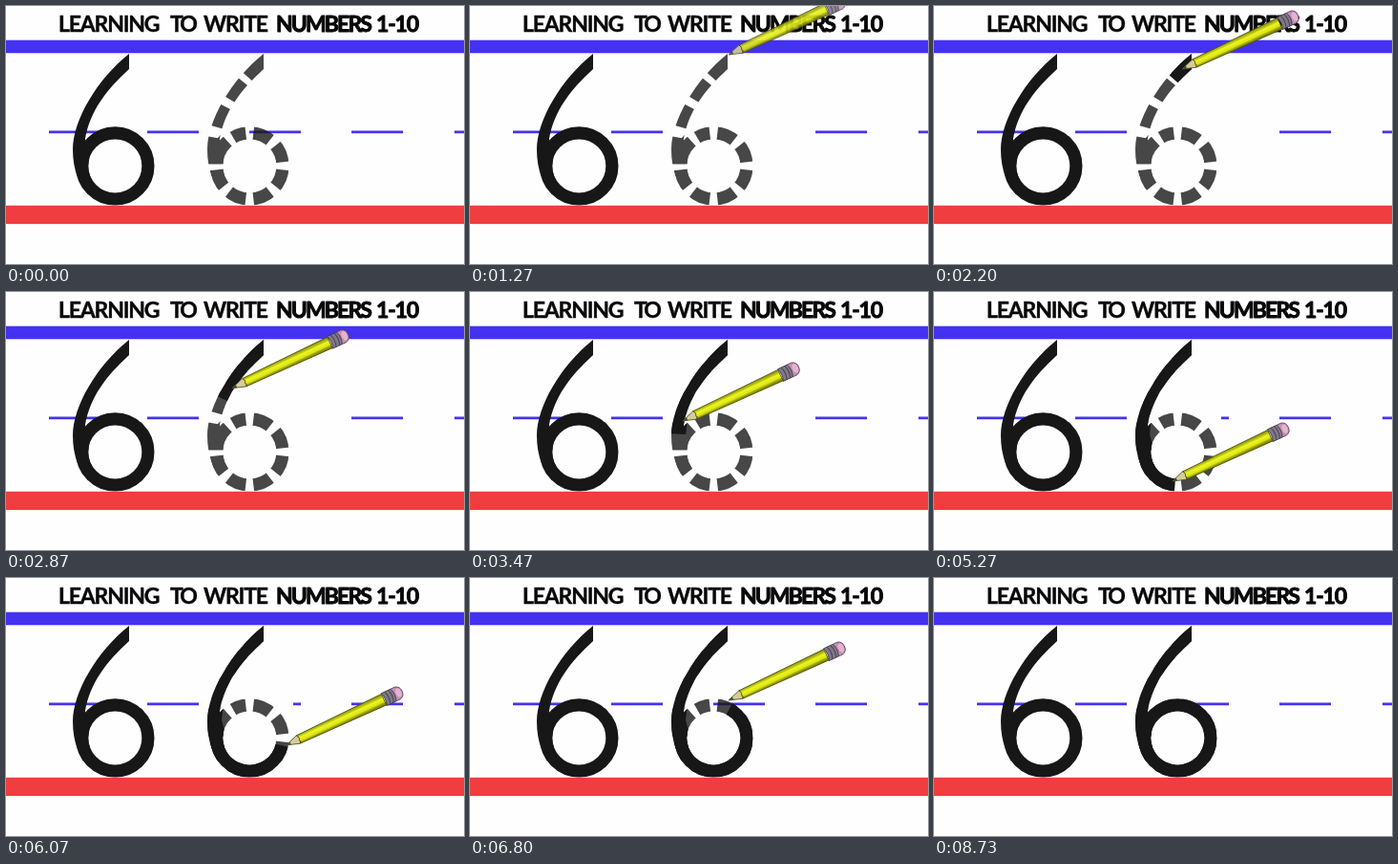
Recreate the animation shown at these times as an HTML page. Size 480 by 270 pixels, loop 8790 ms.

```html
<!DOCTYPE html>
<html lang="en">
<head>
<meta charset="utf-8">
<title>Learning to write numbers</title>
<style>
  html, body { margin: 0; width: 100%; height: 100%; overflow: hidden; background: #fefefe; }
  svg { display: block; width: 100vw; height: 100vh; }
  .title { font: 700 23px Lato, "Open Sans", sans-serif; letter-spacing: -1.2px; fill: #080808; stroke: #080808; stroke-width: .4; stroke-linejoin: round; }
  .tight { letter-spacing: -3px; }
  .heavy { letter-spacing: -1.9px; stroke-width: .9; }
  .wipe { fill: none; stroke: #fff; stroke-width: 20; }
</style>
</head>
<body>
<svg viewBox="0 0 480 270">
  <defs>
    <g id="six">
      <circle cx="114.3" cy="167.4" r="34.6" fill="none" stroke="#171717" stroke-width="13.2"/>
      <path d="M129 50C95 77 70 120 70 150C70 172 77 187 86 197L91 184Q84 172 87 161L83 139C88 110 105 88 129 66Z" fill="#171717"/>
    </g>
    <mask id="dashes" maskUnits="userSpaceOnUse" x="0" y="0" width="480" height="270">
      <path class="wipe" d="M136 50L131 55C102 79 78 115 77 150V167" stroke-dasharray="34 7 23 9 23 11 28 99"/>
      <path class="wipe" d="M79.7 167.4A34.6 34.6 0 0 0 148.9 167.4A34.6 34.6 0 0 0 79.7 167.4" pathLength="8"
            stroke-dasharray="0 .15 .7 .3 .7 .3 .7 .3 .7 .3 .7 .3 .7 .3 .52 .26 .92 9"/>
    </mask>
    <mask id="written" maskUnits="userSpaceOnUse" x="0" y="0" width="480" height="270">
      <path id="wipe" class="wipe" d="M136 50L131 55C102 79 76 115 75 150L79.7 167.4A34.6 34.6 0 0 0 148.9 167.4A34.6 34.6 0 0 0 79.7 167.4"/>
    </mask>
    <linearGradient id="paint" x2="0" y2="1">
      <stop offset="0" stop-color="#858b08"/>
      <stop offset=".25" stop-color="#bcc40a"/>
      <stop offset=".38" stop-color="#ecf526"/>
      <stop offset=".66" stop-color="#dbe60c"/>
      <stop offset=".78" stop-color="#a0a608"/>
      <stop offset="1" stop-color="#6c700a"/>
    </linearGradient>
  </defs>

  <rect width="480" height="270" fill="#fefefe"/>
  <path d="M45 131.8H98M148 131.8H202M255 131.8H309M362 131.8H416M470 131.8H480" stroke="#4432f0" stroke-width="2.8"/>
  <rect id="patch" x="205" y="128" height="7" fill="#fefefe"/>
  <rect y="35.7" width="480" height="13.6" fill="#4432f0"/>
  <rect y="208.8" width="480" height="19.3" fill="#f03d40"/>

  <g class="title">
    <text x="55" y="27">LEARNING</text>
    <text class="tight" x="172" y="27">TO</text>
    <text x="207" y="27">WRITE</text>
    <text class="heavy" x="283" y="27">NUMBERS</text>
    <text x="388" y="27" stroke-width=".9">1-10</text>
  </g>

  <use href="#six"/>
  <g transform="translate(141 0)">
    <g mask="url(#dashes)" opacity=".79"><use href="#six"/></g>
    <g mask="url(#written)"><use href="#six"/></g>
  </g>

  <g id="pencil" stroke-linejoin="round">
    <path d="M0 0L14 -4.6L17 0L14 4.6Z" fill="#d6cc98" stroke="#55502a" stroke-width=".8"/>
    <path d="M0 0L5 -1.8V1.8Z" fill="#4a4a30"/>
    <path d="M14 -4.6L113 -6.3V6.3L14 4.6Q17 3 14.5 1.5Q17 -1 14 -4.6Z" fill="url(#paint)" stroke="#4c500a" stroke-width=".8"/>
    <path d="M113 -7H124Q127 0 124 7H113Q116 0 113 -7Z" fill="#80788a" stroke="#3d3740" stroke-width=".8"/>
    <path d="M117 -7Q120 0 117 7M121 -7Q124 0 121 7" fill="none" stroke="#4a434e"/>
    <path d="M124 -7H129Q134 -5.5 134 0T129 7H124Q127 0 124 -7Z" fill="#c48fb4" stroke="#5d4055" stroke-width=".8"/>
    <ellipse cx="130" rx="2.8" ry="4.8" fill="#e4b4d2"/>
  </g>
</svg>
<script>
const LOOP = 8790, STEP = 200 / 3;
const byId = id => document.getElementById(id);
const wipe = byId('wipe'), pencil = byId('pencil'), patch = byId('patch');
const wipeLength = wipe.getTotalLength();

// time, tip x, tip y
const tipPath = [
  [1600, 271, 51], [2200, 260, 66], [2800, 239, 97], [3330, 225, 127], [3470, 223, 135],
  [4330, 224.5, 173.5], [4800, 233, 190], [5270, 250, 198], [5700, 278, 194], [6130, 295, 171],
  [6480, 291, 146], [6800, 271, 128], [7000, 259, 126], [7430, 231, 137]
];
// time, written length
const inkPath = [
  [1600, 0], [2200, 37], [3470, 119], [4330, 147], [5270, 190], [6800, 284], [7430, wipeLength + 1]
];

const clamp = v => Math.max(0, Math.min(1, v));

function sample(table, t, column, smooth) {
  const last = table.length - 1;
  if (t <= table[0][0]) return table[0][column];
  if (t >= table[last][0]) return table[last][column];
  const i = table.findIndex(row => row[0] > t) - 1;
  const [a, b] = [table[i], table[i + 1]], span = b[0] - a[0], u = (t - a[0]) / span;
  if (!smooth) return a[column] + (b[column] - a[column]) * u;
  const slope = k => {
    const p = table[Math.max(0, k - 1)], n = table[Math.min(last, k + 1)];
    return (n[column] - p[column]) / (n[0] - p[0]) * span;
  };
  const u2 = u * u, u3 = u2 * u;
  return (2 * u3 - 3 * u2 + 1) * a[column] + (u3 - 2 * u2 + u) * slope(i)
       + (3 * u2 - 2 * u3) * b[column] + (u3 - u2) * slope(i + 1);
}

function draw(now) {
  const t = Math.floor((now % LOOP + 5) / STEP) * STEP;
  const x = sample(tipPath, t, 1, true), y = sample(tipPath, t, 2, true);
  pencil.setAttribute('transform', `translate(${x} ${y}) rotate(-25)`);
  pencil.setAttribute('opacity', clamp((t - 740) / 590) * clamp((7930 - t) / 500));
  wipe.setAttribute('stroke-dasharray', `${sample(inkPath, t, 1)} 999`);
  patch.setAttribute('width', t < 795 || t > 6120 ? 0 : t < 4260 ? 106 : 96);
}

const start = performance.now();
function tick() {
  draw(performance.now() - start);
  requestAnimationFrame(tick);
}
tick();
</script>
</body>
</html>
```
